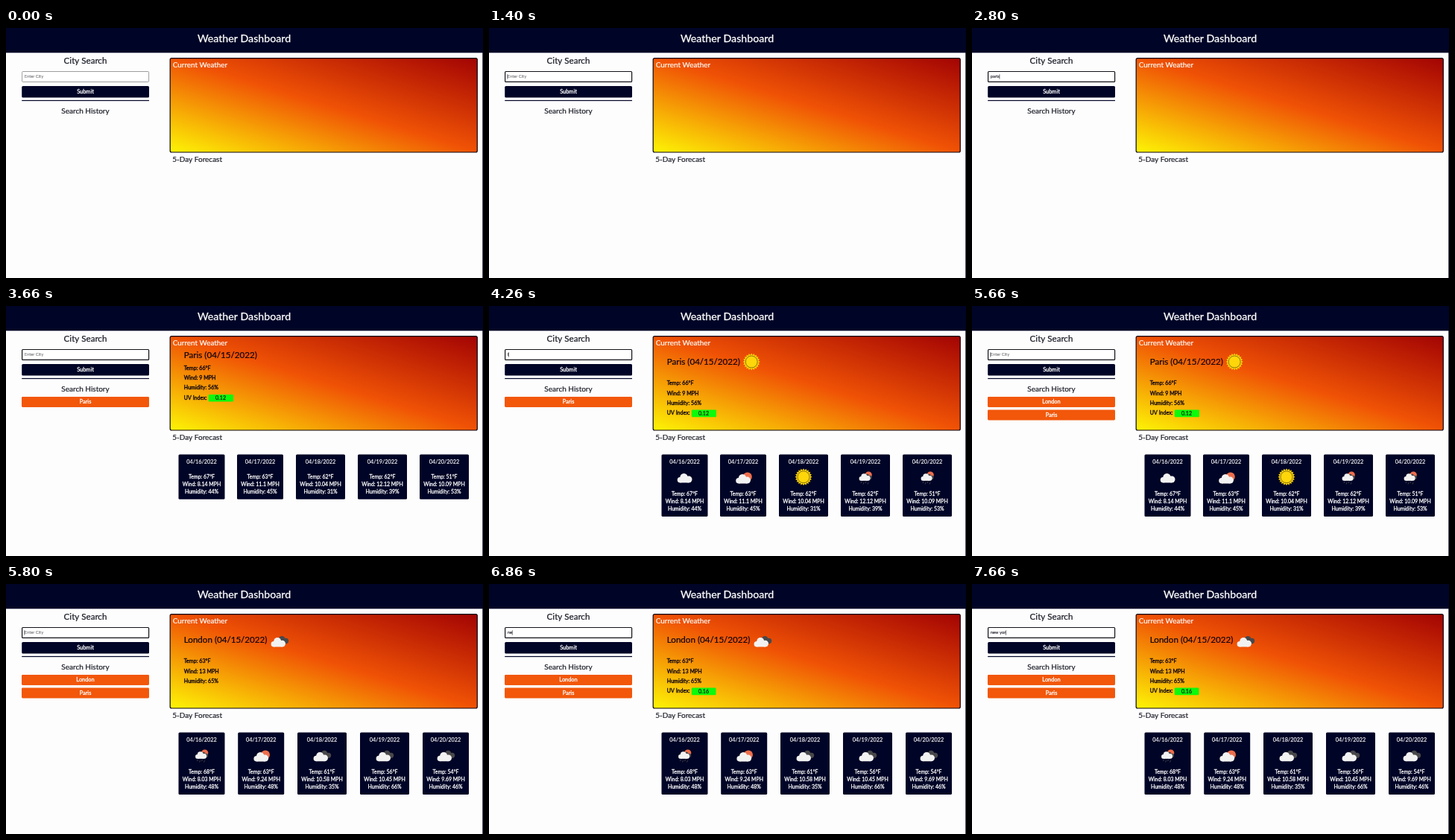
Animation, 640 px wide and 336 px high, one loop 8000 ms. Source, as an HTML page with a canvas:

```html
<!DOCTYPE html>
<html lang="en">
<head>
<meta charset="utf-8">
<title>Weather Dashboard</title>
<style>
html, body { margin: 0; width: 100%; height: 100%; overflow: hidden; background: #fdfdfd; }
canvas { display: block; width: 640px; height: 336px; }
</style>
</head>
<body>
<canvas id="stage"></canvas>
<script>
const LOOP = 8000;
const NAVY = '#000426', INK = '#1c1e28', ORANGE = '#f2570a', WHITE = '#ffffff';
const canvas = document.getElementById('stage');
const ctx = canvas.getContext('2d');
const dpr = window.devicePixelRatio || 1;
canvas.width = 640 * dpr;
canvas.height = 336 * dpr;
ctx.scale(dpr, dpr);

// Each day: card centre, card width, icon, temperature, wind, humidity
const cities = {
  Paris: {
    icon: 'sun', iconX: 352.2, iconY: 75, now: [66, 9, 56], uv: '0.12', uvRight: 305,
    days: [
      [262.5, 62, 'cloud', 67, 8.14, 44],
      [341, 62, 'fair', 63, 11.1, 45],
      [422, 66, 'sun', 62, 10.04, 31],
      [505, 66, 'rain', 62, 12.12, 39],
      [588, 66, 'rain', 51, 10.09, 53]
    ]
  },
  London: {
    icon: 'broken', iconX: 367, iconY: 76, now: [63, 13, 65], uv: '0.16', uvRight: 304.5,
    days: [
      [262.5, 62, 'rain', 68, 8.03, 48],
      [342.2, 62, 'fair', 63, 9.24, 48],
      [424, 66, 'broken', 61, 10.58, 35],
      [508, 66, 'broken', 56, 10.45, 66],
      [590, 62, 'broken', 54, 9.69, 46]
    ]
  }
};

// Key presses: [word, time of each letter, time it is sent]
const entries = [
  ['paris', [2060, 2200, 2330, 2600, 2730], 3130],
  ['london', [4260, 4460, 4660, 5130, 5200, 5400], 5660],
  ['new yor', [6660, 6860, 6930, 7200, 7330, 7400, 7660], LOOP]
];
const caretOff = [[0, 1000], [1600, 2060], [3600, 3930], [6400, 6660]];

function text(str, x, y, size, color, align = 'left', weight = 0.02) {
  ctx.font = `${size}px Lato, sans-serif`;
  ctx.textAlign = align;
  ctx.fillStyle = ctx.strokeStyle = color;
  ctx.lineWidth = size * weight;
  ctx.lineJoin = 'round';
  ctx.fillText(str, x, y);
  ctx.strokeText(str, x, y);
}

function box(x, y, w, h, r, fill, line, lineWidth = 1) {
  ctx.beginPath();
  ctx.roundRect(x, y, w, h, r);
  if (fill) { ctx.fillStyle = fill; ctx.fill(); }
  if (line) { ctx.strokeStyle = line; ctx.lineWidth = lineWidth; ctx.stroke(); }
}

function disc(x, y, r, color) {
  ctx.beginPath();
  ctx.arc(x, y, r, 0, Math.PI * 2);
  ctx.fillStyle = color;
  ctx.fill();
}

function cloud(x, y, s, color) {
  disc(x - 6 * s, y + 2.6 * s, 3.8 * s, color);
  disc(x - 1 * s, y - 1 * s, 5.2 * s, color);
  disc(x + 5.5 * s, y + 1.9 * s, 4.5 * s, color);
  ctx.fillRect(x - 6 * s, y + 1 * s, 11.5 * s, 5.4 * s);
}

function sun(x, y) {
  const points = 20;
  ctx.beginPath();
  for (let i = 0; i < points * 2; i++) {
    const a = i * Math.PI / points, r = i % 2 ? 9.2 : 11.5;
    ctx.lineTo(x + r * Math.sin(a), y - r * Math.cos(a));
  }
  ctx.closePath();
  ctx.fillStyle = '#ffd60a';
  ctx.fill();
  ctx.beginPath();
  ctx.arc(x, y, 8, 0, Math.PI * 2);
  ctx.strokeStyle = '#6b5714';
  ctx.lineWidth = 0.8;
  ctx.stroke();
}

const LIGHT = '#f2f2f2', DARK = '#48484a', CORAL = '#ec6e4c';
const icons = {
  sun,
  cloud(x, y) { cloud(x, y + 1.3, 1, LIGHT); },
  fair(x, y) {
    disc(x + 5.8, y - 0.3, 6, CORAL);
    cloud(x, y + 2.4, 1, LIGHT);
  },
  broken(x, y) {
    cloud(x + 4, y - 1, 0.82, DARK);
    cloud(x - 1.8, y + 2.2, 0.98, LIGHT);
  },
  rain(x, y) {
    disc(x + 4.2, y - 2.8, 4.6, CORAL);
    cloud(x + 2.6, y - 0.4, 0.6, DARK);
    cloud(x - 1, y + 0.2, 0.76, LIGHT);
    ctx.strokeStyle = DARK;
    ctx.lineWidth = 0.9;
    ctx.beginPath();
    for (let i = 0; i < 4; i++) {
      const dx = x - 5.5 + i * 3, dy = y + 6 + (i % 2) * 1.4;
      ctx.moveTo(dx + 0.5, dy);
      ctx.lineTo(dx - 0.5, dy + 2.4);
    }
    ctx.stroke();
  }
};

// Corner to corner, so the middle colour runs along the other diagonal
function panelFill(x, y, w, h) {
  const gx = 0.5 / w, gy = -0.5 / h, n = gx * gx + gy * gy;
  const g = ctx.createLinearGradient(x, y + h, x + gx / n, y + h + gy / n);
  g.addColorStop(0, '#fdf505');
  g.addColorStop(0.5, '#f05305');
  g.addColorStop(1, '#a20303');
  return g;
}

function drawFrame() {
  ctx.fillStyle = '#fdfdfd';
  ctx.fillRect(0, 0, 640, 336);
  ctx.fillStyle = NAVY;
  ctx.fillRect(0, 0, 640, 33.3);
  ctx.fillRect(639.3, 33, 0.7, 303);
  text('Weather Dashboard', 319.5, 19.2, 14.2, WHITE, 'center');
  text('City Search', 106.5, 48.2, 11.6, INK, 'center');
  box(21.2, 78, 170.8, 15.6, 1.6, NAVY);
  text('Submit', 106.5, 88, 7.4, WHITE, 'center', 0.04);
  ctx.fillStyle = NAVY;
  ctx.fillRect(21.2, 96.9, 170.8, 1.2);
  text('Search History', 106.5, 115.2, 10, INK, 'center');
  box(220.2, 40.6, 412.1, 126.4, 2, panelFill(220, 40, 412, 127), '#0a0410', 1.2);
  text('Current Weather', 223.8, 52.6, 9.9, WHITE);
  text('5-Day Forecast', 223.2, 179.5, 10, INK);
}

function drawInput(t) {
  const focused = t >= 1000;
  box(21.6, 58.5, 170, 13.9, 1, WHITE, focused ? '#101018' : '#858585', focused ? 1.2 : 0.8);
  const [word, keys] = entries.find(e => t < e[2]);
  const typed = word.slice(0, keys.filter(k => k <= t).length);
  text(typed || 'Enter City', 24.8, 67.4, 5.75, typed ? INK : '#7c7c80');
  if (caretOff.some(([a, b]) => t >= a && t < b)) return;
  const end = typed ? ctx.measureText(typed).width : 0;
  ctx.fillStyle = '#101018';
  ctx.fillRect(24.6 + end, 62.2, 0.6, 6.4);
}

function drawHistory(t) {
  const names = t >= 5660 ? ['London', 'Paris'] : t >= 3130 ? ['Paris'] : [];
  names.forEach((name, i) => {
    const y = 122 + i * 17.5;
    box(21, y, 171, 14, 1.4, ORANGE);
    text(name, 106.5, y + 9.4, 7.4, WHITE, 'center', 0.04);
  });
}

function drawWeather(name, hasIcons, hasUv) {
  const city = cities[name], [temp, wind, humidity] = city.now;
  const drop = hasIcons ? 20.6 : 0;
  const ink = '#12060e';
  text(`${name} (04/15/2022)`, 238.8, hasIcons ? 79.4 : 69.6, 11.6, ink);
  if (hasIcons) icons[city.icon](city.iconX, city.iconY);
  const lines = [`Temp: ${temp}°F`, `Wind: ${wind} MPH`, `Humidity: ${humidity}%`];
  if (hasUv) lines.push('UV Index:');
  lines.forEach((s, i) => text(s, 238.8, 85.6 + drop + i * 13.4, 7.1, ink, 'left', 0.05));
  if (hasUv) {
    box(271.8, 119 + drop, city.uvRight - 271.8, 9.6, 1, '#0bfa0b');
    text(city.uv, 288, 126 + drop, 7.1, ink, 'center');
  }

  const gap = hasIcons ? 23.2 : 0;
  city.days.forEach(([x, w, icon, t, v, h], i) => {
    box(x - w / 2, 199.4, w, 60.4 + gap, 1.6, NAVY);
    text(`04/${16 + i}/2022`, x, 211.7, 7.3, WHITE, 'center');
    if (hasIcons) icons[icon](x, 229.8);
    [`Temp: ${t}°F`, `Wind: ${v} MPH`, `Humidity: ${h}%`].forEach((s, row) =>
      text(s, x, 231.8 + gap + row * 10, 6.95, WHITE, 'center', 0.04));
  });
}

function draw(t) {
  drawFrame();
  drawInput(t);
  drawHistory(t);
  if (t >= 5730) drawWeather('London', t >= 5800, t >= 5930);
  else if (t >= 3600) drawWeather('Paris', t >= 3730, t >= 3660);
}

const start = performance.now();
function tick() {
  draw((performance.now() - start) % LOOP);
  requestAnimationFrame(tick);
}
tick();
</script>
</body>
</html>
```
